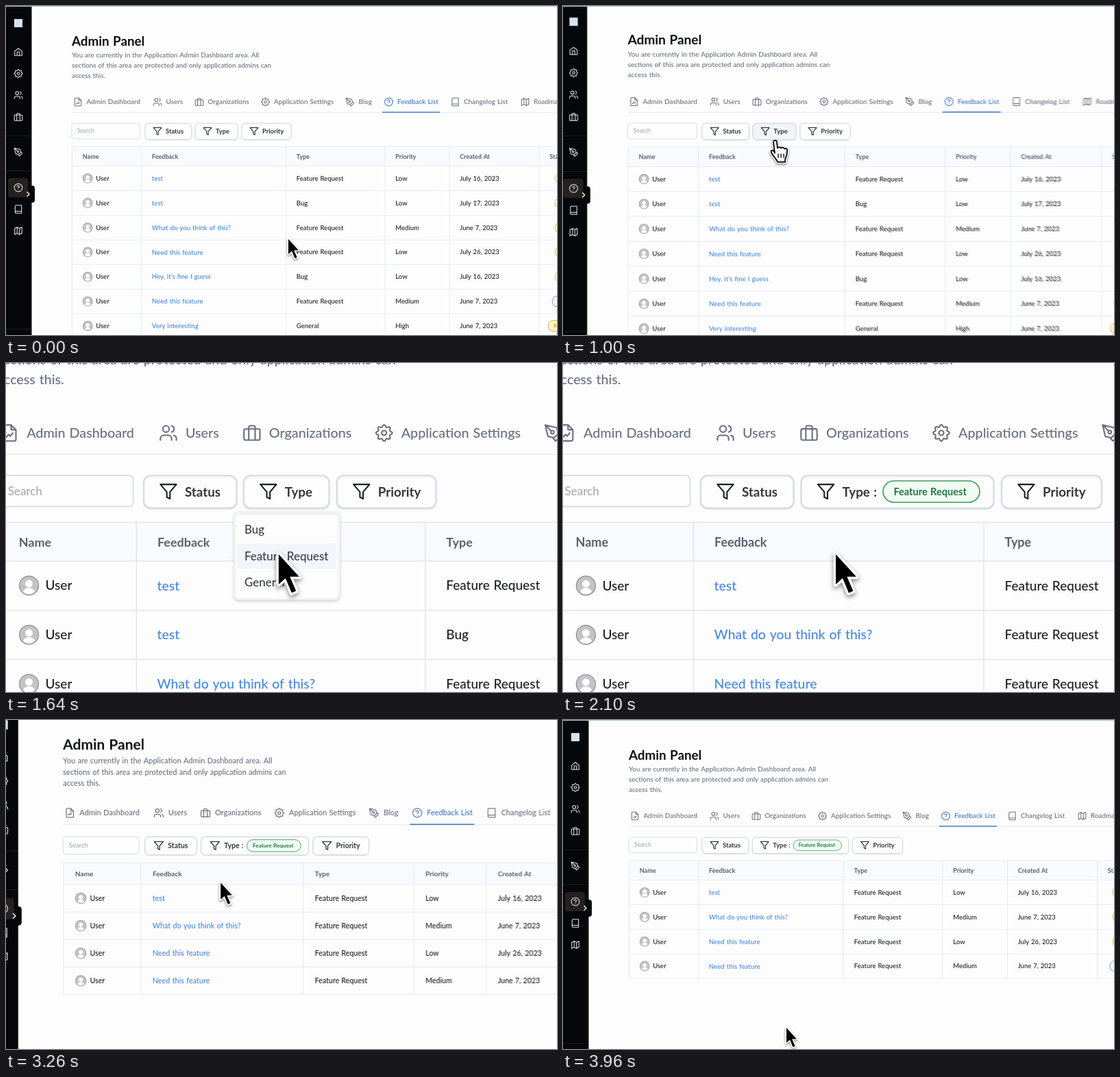
Animation of 804 by 480 pixels, one loop 3980 ms. Source, as an HTML page with a canvas:

```html
<!DOCTYPE html>
<html lang="en">
<head>
<meta charset="utf-8">
<title>Admin panel filter</title>
<style>
html, body { margin: 0; width: 100%; height: 100%; overflow: hidden; background: #fdfdfd; }
canvas { display: block; }
</style>
</head>
<body>
<canvas id="stage" width="804" height="480"></canvas>
<script>
const W = 804, H = 480, LOOP = 3980;
const FOCUS = { x: 205, y: 178 };
const OPEN_AT = 1200, PICK_AT = 1950;
const PAPER = '#fdfdfd', LINE = '#e2e7f0', EDGE = '#d0d9e2', INK = '#1c1f26',
      GREY = '#687080', BLUE = '#3f74c8', LINK = '#4688e2', SIDE = '#05070a';

const out = document.getElementById('stage').getContext('2d');
const buffer = document.createElement('canvas');
buffer.width = W;
buffer.height = H;
const c = buffer.getContext('2d');

// Icons on a 24-unit grid
function gearPath() {
  let d = '';
  for (let i = 0; i < 96; i++) {
    const a = i / 96 * 2 * Math.PI, r = 8.9 + 1.3 * Math.cos(8 * a);
    d += `${i ? 'L' : 'M'}${12 + r * Math.cos(a)} ${12 + r * Math.sin(a)}`;
  }
  return d + 'ZM15 12a3 3 0 1 1-6 0a3 3 0 1 1 6 0';
}
const icons = {
  home: 'M3 10l9-7 9 7v11H3zM9 21v-9h6v9',
  gear: gearPath(),
  users: 'M16 21v-2a4 4 0 0 0-4-4H6a4 4 0 0 0-4 4v2M22 21v-2a4 4 0 0 0-3-3.9M16 3.1a4 4 0 0 1 0 7.8M13 7a4 4 0 1 1-8 0a4 4 0 1 1 8 0',
  bag: 'M4 7h16a2 2 0 0 1 2 2v10a2 2 0 0 1-2 2H4a2 2 0 0 1-2-2V9a2 2 0 0 1 2-2zM8 21V5a2 2 0 0 1 2-2h4a2 2 0 0 1 2 2v16',
  pen: 'M12 19l7-7 3 3-7 7zM18 13l-1.5-7.5L2 2l3.5 14.5L13 18zM2 2l7.6 7.6M13 11a2 2 0 1 1-4 0a2 2 0 1 1 4 0',
  help: 'M22 12a10 10 0 1 1-20 0a10 10 0 1 1 20 0M9 9a3 3 0 0 1 5.8 1c0 2-3 3-3 3M12 17h.01',
  book: 'M4 19.5v-15A2.5 2.5 0 0 1 6.5 2H20v20H6.5a2.5 2.5 0 0 1 0-5H20',
  map: 'M3 6l6-3 6 3 6-3v15l-6 3-6-3-6 3zM9 3v15M15 6v15',
  file: 'M14 2H6a2 2 0 0 0-2 2v16a2 2 0 0 0 2 2h12a2 2 0 0 0 2-2V8zM14 2v6h6M8 17l3-3 2 2 3-4',
  funnel: 'M22 3H2l8 9.5V19l4 2v-8.5z'
};
for (const name in icons) icons[name] = new Path2D(icons[name]);

const arrow = new Path2D('M0 0V22L5 17.5 9.5 28.2 12.7 26.8 8.2 16.4H15z');
const hand = new Path2D('M-3 2c0-3 5-3 5 0l1 9c1-2 4-2 5 0 1-2 4-1 5 1 1-1 4-1 4 2 0 7-1 9-3 13v4H3c-1-4-7-9-9-14-1-3 2-4 4-1l1 2z');
const knuckles = new Path2D('M4 19v6M8 19v6M12 19v6');

const tabs = [
  ['file', 105, 'Admin Dashboard'], ['users', 221, 'Users'], ['bag', 282, 'Organizations'],
  ['gear', 378.5, 'Application Settings'], ['pen', 502, 'Blog'], ['help', 558.5, 'Feedback List'],
  ['book', 655.5, 'Changelog List'], ['map', 757.5, 'Roadmap']
];
const sideIcons = [['home', 67], ['gear', 98.5], ['users', 130], ['bag', 162], ['pen', 213],
  ['help', 265], ['book', 296.5], ['map', 328]];
const headers = ['Name', 'Feedback', 'Type', 'Priority', 'Created At', 'Status'];
const FEATURE = 'Feature Request';
const choices = ['Bug', FEATURE, 'General'];
const rows = [
  ['test', FEATURE, 'Low', 'July 16, 2023', 'Open'],
  ['test', 'Bug', 'Low', 'July 17, 2023', 'Open'],
  ['What do you think of this?', FEATURE, 'Medium', 'June 7, 2023', 'Open'],
  ['Need this feature', FEATURE, 'Low', 'July 26, 2023', 'Open'],
  ["Hey, it's fine I guess", 'Bug', 'Low', 'July 16, 2023', 'Open'],
  ['Need this feature', FEATURE, 'Medium', 'June 7, 2023', 'Planned'],
  ['Very interesting', 'General', 'High', 'June 7, 2023', 'In Progress']
];
const pills = {
  Open: [801, '#e0a030', '#fffaf0'],
  Planned: [797, '#5a80d8', '#f3f7ff'],
  'In Progress': [791, '#c79a2c', '#fdf3c4']
};

function text(str, x, y, size, color = INK, weight = 500) {
  c.font = `${weight} ${size}px Lato, "Open Sans", sans-serif`;
  c.wordSpacing = `${size * 0.05}px`;
  c.fillStyle = color;
  c.fillText(str, x, y + size * 0.35);
}
function rect(x, y, w, h, color) {
  c.fillStyle = color;
  c.fillRect(x, y, w, h);
}
function box(x, y, w, h, r, fill, edge) {
  c.beginPath();
  c.roundRect(x, y, w, h, r);
  c.fillStyle = fill;
  c.fill();
  if (!edge) return;
  c.strokeStyle = edge;
  c.lineWidth = 0.8;
  c.stroke();
}
function shadowed(draw, blur, dy, color) {
  const s = c.getTransform().a;
  c.save();
  c.shadowColor = color;
  c.shadowBlur = blur * s;
  c.shadowOffsetY = dy * s;
  draw();
  c.restore();
}
function icon(name, x, y, color, size = 14) {
  c.save();
  c.translate(x, y);
  c.scale(size / 24, size / 24);
  c.translate(-12, -12);
  c.strokeStyle = color;
  c.lineWidth = 1.8;
  c.lineCap = c.lineJoin = 'round';
  c.stroke(icons[name]);
  c.restore();
}
function disc(x, y, r, color) {
  c.beginPath();
  c.arc(x, y, r, 0, 7);
  c.fillStyle = color;
  c.fill();
}

function avatar(x, y) {
  disc(x, y, 7.3, '#8c8c90');
  disc(x, y, 6.7, '#c4c4c8');
  c.save();
  c.beginPath();
  c.arc(x, y, 6.2, 0, 7);
  c.clip();
  disc(x, y - 1.4, 2.7, '#fff');
  disc(x, y + 6.4, 4.8, '#fff');
  c.restore();
}

function button(x, w, label, fill = PAPER) {
  shadowed(() => box(x, 171, w, 23.8, 5, fill, EDGE), 1, 0.6, 'rgba(60,80,110,.15)');
  icon('funnel', x + 18, 182.8, INK);
  text(label, x + 30, 183, 9.4, '#33373f', 700);
}

function sidebar() {
  rect(0, 0, 37.5, H, SIDE);
  box(24, 262, 18, 25, 4, SIDE);
  box(3, 251, 29, 28, 4, '#26211f');
  rect(12, 19, 12, 12, '#d3e3f2');
  for (const y of [189, 240, 471]) rect(0, y, 37.5, 0.8, '#25262a');
  for (const [name, y] of sideIcons) icon(name, 18, y, '#e4e6ea');
  c.beginPath();
  c.moveTo(30.5, 271);
  c.lineTo(34, 274.5);
  c.lineTo(30.5, 278);
  c.strokeStyle = '#fff';
  c.lineWidth = 1.3;
  c.stroke();
}

function heading() {
  text('Admin Panel', 96, 51, 18.8, '#0e1015', 700);
  ['You are currently in the Application Admin Dashboard area. All',
   'sections of this area are protected and only application admins can',
   'access this.'].forEach((line, i) => text(line, 96, 72 + 14.6 * i, 9.8, GREY));
  rect(96, 155.2, 760, 0.8, LINE);
  for (const [name, x, label] of tabs) {
    const color = name === 'help' ? BLUE : GREY;
    icon(name, x, 140, color);
    text(label, x + 12.5, 140, 9.9, color);
  }
  rect(549, 154.3, 84, 1.4, BLUE);
}

function filters(hover, picked) {
  box(96, 171, 99.3, 22.8, 3, PAPER, EDGE);
  text('Search', 103.8, 182.3, 8.5, '#a0a5ae', 400);
  button(203, 67.8, 'Status');
  if (!picked) {
    button(276, 62.4, 'Type', hover ? '#f1f4f8' : PAPER);
    button(344, 72.4, 'Priority');
    return;
  }
  button(276.3, 140.5, 'Type :');
  box(336, 175, 70.5, 15.6, 7.8, '#effcf3', '#3f9a5c');
  text(FEATURE, 343.7, 182.8, 7.3, '#28753f', 700);
  button(422.5, 73, 'Priority');
}

function table(picked) {
  const shown = picked ? rows.filter(r => r[1] === FEATURE) : rows;
  const shift = picked ? 1 : 0;
  const cols = [96.5, 197.7, 408.5 + shift, 553 + shift, 647 + shift * 1.4, 778 + shift * 1.5];
  const top = 205.2, first = 233.5, step = 35.9, bottom = first + shown.length * step;
  rect(96.5, top, 800, first - top, '#f8fafd');
  headers.forEach((h, i) => text(h, cols[i] + 15.3, 219.7, 9, '#596070', 700));
  shown.forEach((row, i) => {
    const y = first + step * (i + 0.5);
    avatar(119.2, y);
    text('User', 131.2, y, 9.5);
    text(row[0], cols[1] + 15.1, y, 9.7, LINK);
    for (let k = 1; k < 4; k++) text(row[k], cols[k + 1] + 15.3, y, 9.5);
    const [x, edge, fill] = pills[row[4]];
    box(x + shift, y - 8, 70, 16, 8, fill, edge);
    text(row[4], x + shift + 8, y, 7.3, edge, 700);
    rect(96.5, first + step * i - 0.4, 800, 0.8, LINE);
  });
  rect(96.5, top - 0.4, 800, 0.8, LINE);
  rect(96.5, bottom - 0.4, 800, 0.8, LINE);
  for (const x of cols) rect(x - 0.4, top, 0.8, bottom - top, LINE);
}

function menu(cursor) {
  shadowed(() => box(269, 197.5, 77, 64, 3, PAPER, '#f0f2f5'), 2, 1, 'rgba(60,70,90,.2)');
  choices.forEach((label, i) => {
    const y = 210.5 + 19.4 * i;
    if (Math.abs(cursor.y - y) < 9.3) box(271.5, y - 9.3, 72, 18.6, 2, '#f2f5f9');
    text(label, 276.5, y, 8.5, '#3a3e48');
  });
}

function drawCursor({ x, y }, pointing) {
  const shape = pointing ? hand : arrow;
  c.save();
  c.translate(x, y);
  c.lineJoin = 'round';
  c.strokeStyle = '#fff';
  c.lineWidth = pointing ? 4.5 : 3.4;
  shadowed(() => c.stroke(shape), 3, 1.5, 'rgba(20,20,25,.5)');
  c.fillStyle = pointing ? '#fff' : '#000';
  c.fill(shape);
  if (pointing) {
    c.strokeStyle = '#000';
    c.lineWidth = 1.8;
    c.stroke(shape);
    c.lineWidth = 1.3;
    c.stroke(knuckles);
  }
  c.restore();
}

// Critically damped spring, 0 to 1
function spring(ms) {
  const x = Math.max(0, ms) * 0.0133;
  return 1 - (1 + x) * Math.exp(-x);
}
const zoomAt = t => 1 + spring(t - 988) - spring(t - 2984);

const path = [[0, 412, 340], [120, 412, 340], [880, 308.6, 196], [1320, 308.6, 196],
  [1600, 301.5, 228.5], [3220, 301.5, 228.5], [3860, 326, 449], [LOOP, 326, 449]];
function cursorAt(t) {
  const i = path.findIndex(p => p[0] > t);
  const [t0, x0, y0] = path[i - 1], [t1, x1, y1] = path[i];
  const u = (t - t0) / (t1 - t0), e = u * u * (3 - 2 * u);
  return { x: x0 + (x1 - x0) * e, y: y0 + (y1 - y0) * e };
}

function scene(t) {
  const s = zoomAt(t), cursor = cursorAt(t), picked = t >= PICK_AT;
  const pointing = t < OPEN_AT && cursor.y < 197;
  c.setTransform(1, 0, 0, 1, 0, 0);
  rect(0, 0, W, H, PAPER);
  c.setTransform(s, 0, 0, s, FOCUS.x * (1 - s), FOCUS.y * (1 - s));
  heading();
  filters(pointing, picked);
  table(picked);
  sidebar();
  if (t >= OPEN_AT && !picked) menu(cursor);
  drawCursor(cursor, pointing);
  if (s < 1.05) {
    c.setTransform(1, 0, 0, 1, 0, 0);
    rect(0, 0, W, 1, '#a4cdc8');
  }
}

// Several moments within the shutter are averaged for motion blur
const start = performance.now();
function frame() {
  const t = (performance.now() - start) % LOOP, samples = 4;
  for (let i = 0; i < samples; i++) {
    scene(Math.min(LOOP - 1, Math.max(0, t + (i - 1.5) * 0.9)));
    out.globalAlpha = 1 / (i + 1);
    out.drawImage(buffer, 0, 0);
  }
  requestAnimationFrame(frame);
}
frame();
</script>
</body>
</html>
```
